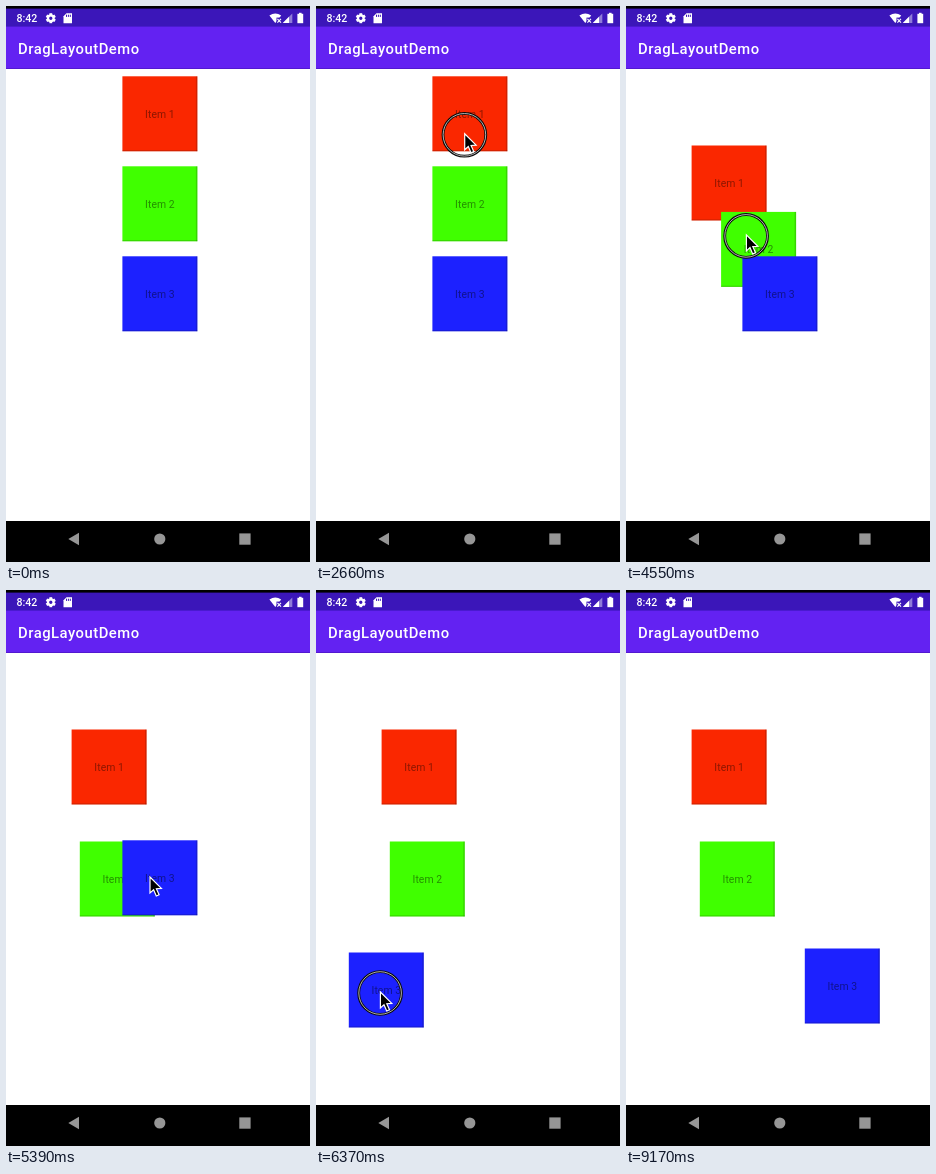
These frames come from a looping animation (304x556 px, 9730 ms). An HTML page with a canvas:

```html
<!DOCTYPE html>
<html lang="en">
<head>
<meta charset="utf-8">
<title>Drag layout</title>
<style>
html, body { margin: 0; width: 100%; height: 100%; overflow: hidden; background: #fff; }
canvas { display: block; width: 304px; height: 556px; }
</style>
</head>
<body>
<canvas id="stage"></canvas>
<script>
const W = 304, H = 556, LOOP = 9730, STEP = 70, SIZE = 75;
const FONT = 'Roboto, "Noto Sans", sans-serif';
const BAR = '#3b16b9', TOOLBAR = '#6322f2', NAV = '#969696';
const canvas = document.getElementById('stage');
const ctx = canvas.getContext('2d');
const ratio = window.devicePixelRatio || 1;
canvas.width = W * ratio;
canvas.height = H * ratio;

// lead: pointer on its way to the item; hold: grab point inside the item.
// Keys are [time, x, y].
const items = [
  { fill: '#fa2700', lead: [1050, 180, 438], arrive: 2030, press: 2660, release: 3290,
    hold: [32, 58.5], stops: [[3080, 65.6, 139.5]] },
  { fill: '#40ff00', lead: [3780, 109, 180], arrive: 4060, press: 4270, release: 4970,
    hold: [25, 24], stops: [[4830, 73.8, 251.5]] },
  { fill: '#1c21ff', lead: [5390, 143.7, 288], arrive: 5530, press: 5670, release: 7070,
    hold: [31.3, 40.5], stops: [[6370, 32.8, 362.5], [7000, 177, 356.7], [7070, 178.8, 358.5]] }
];
const ENTER = 70, LEAVE = 7280;

function itemTrack({ press, stops }, i) {
  return [[press, 116.4, 70.3 + 90 * i], ...stops];
}

// The pointer follows from the drags: approach, grab, carry, release.
function pointerPath({ lead, arrive, release, hold, track }) {
  const carried = track.map(([t, x, y]) => [t, x + hold[0], y + hold[1]]);
  const [, ...grab] = carried[0];
  const [, ...drop] = carried[carried.length - 1];
  return [lead, [arrive, ...grab], ...carried, [release, ...drop]];
}

items.forEach((item, i) => {
  item.label = `Item ${i + 1}`;
  item.track = itemTrack(item, i);
});
const pointer = [
  [ENTER, 188, 545], [350, 180, 438],
  ...items.flatMap(pointerPath),
  [7140, 218, 488]
];

function at(track, t) {
  const next = track.findIndex(k => k[0] > t);
  if (next === 0) return track[0].slice(1);
  if (next < 0) return track[track.length - 1].slice(1);
  const [t0, x0, y0] = track[next - 1], [t1, x1, y1] = track[next];
  const u = (t - t0) / (t1 - t0), e = u * u * (3 - 2 * u);
  return [x0 + (x1 - x0) * e, y0 + (y1 - y0) * e];
}

function rect(x, y, w, h, fill) {
  ctx.fillStyle = fill;
  ctx.fillRect(x, y, w, h);
}

function poly(points, fill) {
  ctx.beginPath();
  points.forEach(([x, y]) => ctx.lineTo(x, y));
  ctx.closePath();
  ctx.fillStyle = fill;
  ctx.fill();
}

function disc(x, y, r, fill) {
  ctx.beginPath();
  ctx.arc(x, y, r, 0, Math.PI * 2);
  ctx.fillStyle = fill;
  ctx.fill();
}

function ring(x, y, r, width, color) {
  ctx.beginPath();
  ctx.arc(x, y, r, 0, Math.PI * 2);
  ctx.lineWidth = width;
  ctx.strokeStyle = color;
  ctx.stroke();
}

function text(str, x, y, font, fill, align = 'left', spacing = 0) {
  ctx.font = `${font} ${FONT}`;
  ctx.letterSpacing = spacing + 'px';
  ctx.textAlign = align;
  ctx.fillStyle = fill;
  ctx.fillText(str, x, y);
}

function gear(x, y) {
  ctx.save();
  ctx.translate(x, y);
  for (let i = 0; i < 6; i++) {
    rect(-1.4, -5, 2.8, 3, '#fff');
    ctx.rotate(Math.PI / 3);
  }
  ctx.restore();
  ring(x, y, 2.8, 2.2, '#fff');
}

function memoryCard(x, y) {
  poly([[x + 3, y], [x + 8.5, y], [x + 8.5, y + 10], [x, y + 10], [x, y + 3]], '#fff');
  for (let i = 0; i < 3; i++) rect(x + 2.5 + i * 1.9, y + 1.5, 1, 2.2, BAR);
}

function wifi(x, y) {
  ctx.beginPath();
  ctx.moveTo(x, y);
  ctx.lineTo(x - 5.9, y - 7.4);
  ctx.quadraticCurveTo(x, y - 11.6, x + 5.9, y - 7.4);
  ctx.fillStyle = '#fff';
  ctx.fill();
  rect(x + 1.2, y - 5.4, 6, 6, BAR);
  ctx.beginPath();
  for (const side of [-1, 1]) {
    ctx.moveTo(x + 3.9 - 1.8 * side, y - 4.2);
    ctx.lineTo(x + 3.9 + 1.8 * side, y - 0.4);
  }
  ctx.lineWidth = 1.1;
  ctx.strokeStyle = '#fff';
  ctx.stroke();
}

function wedge(x, y, size, fill) {
  poly([[x, y], [x + size, y], [x + size, y - size]], fill);
}

function statusBar() {
  rect(0, 0, W, 21, BAR);
  rect(0, 0, W, 2.6, '#000');
  text('8:42', 10.5, 16, '500 10.6px', '#fff');
  gear(44.8, 12.2);
  memoryCard(57.5, 7.2);
  wifi(269.3, 17);
  wedge(276.8, 17, 9.5, '#8f7bd8');
  wedge(276.8, 17, 6.2, '#fff');
  rect(293, 6.8, 2.6, 1.5, '#fff');
  rect(291.4, 7.8, 5.8, 9.4, '#fff');
}

function toolbar() {
  rect(0, 20.6, W, 42.4, TOOLBAR);
  rect(0, 62, W, 1, '#5219d0');
  text('DragLayoutDemo', 12, 48, '500 14.8px', '#fff', 'left', 0.5);
}

function navBar() {
  rect(0, 515, W, 41, '#000');
  poly([[62.3, 533], [73, 526.8], [73, 539.2]], NAV);
  disc(153.8, 533, 5.6, NAV);
  rect(233.3, 527.4, 11.3, 11.3, NAV);
}

function drawItem({ label, fill, track }, t) {
  const [x, y] = at(track, t), shade = 'rgba(0,0,0,.16)';
  rect(x, y, SIZE, SIZE, fill);
  rect(x + SIZE - 1.5, y, 1.5, SIZE, shade);
  rect(x, y + SIZE - 1.2, SIZE, 1.2, shade);
  text(label, x + SIZE / 2, y + 41.4, '400 10.4px', 'rgba(0,0,0,.44)', 'center', 0.05);
}

function drawPointer(t) {
  if (t < ENTER || t >= LEAVE) return;
  const [x, y] = at(pointer, t);
  if (items.some(({ press, release }) => t >= press && t < release)) {
    ring(x, y, 21.4, 2.8, '#0a0a0a');
    ring(x, y, 21.3, 0.9, '#c4c4c4');
  }
  ctx.save();
  ctx.translate(x + 0.3, y - 1);
  poly([[0, 0], [0, 16], [3.6, 12.7], [6.3, 19], [9.1, 17.8], [6.4, 11.7], [11.4, 11.4]], '#000');
  ctx.lineWidth = 1.2;
  ctx.strokeStyle = '#fff';
  ctx.stroke();
  ctx.restore();
}

function draw(t) {
  ctx.setTransform(ratio, 0, 0, ratio, 0, 0);
  rect(0, 0, W, H, '#fff');
  statusBar();
  toolbar();
  items.forEach(item => drawItem(item, t));
  navBar();
  drawPointer(t);
}

const start = performance.now();
function frame() {
  const t = (performance.now() - start) % LOOP;
  draw(Math.floor(t / STEP) * STEP);
  requestAnimationFrame(frame);
}
frame();
</script>
</body>
</html>
```
